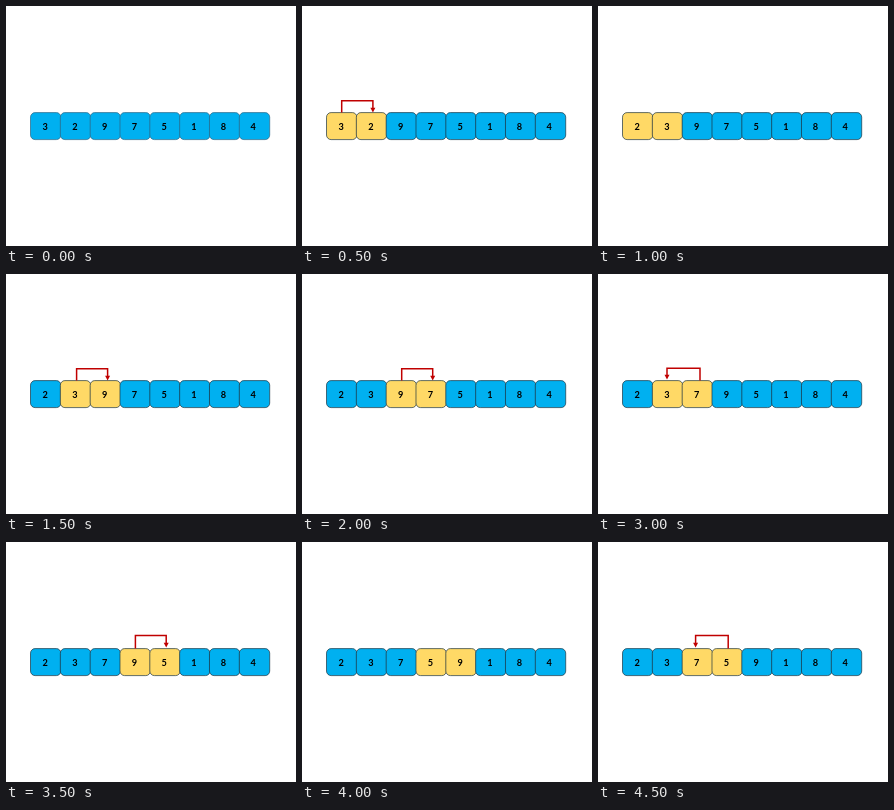
Recreate the animation shown at these times as an HTML page. Size 290 by 240 pixels, loop 5000 ms.

```html
<!DOCTYPE html>
<html lang="en">
<head>
<meta charset="utf-8">
<title>Insertion sort</title>
<style>
  html, body { margin: 0; width: 100%; height: 100%; overflow: hidden; background: #fff; }
  svg { display: block; width: 100%; height: 100%; }
  text { font: 700 9.2px Lato, "Open Sans", sans-serif; text-anchor: middle; fill: #000; }
</style>
</head>
<body>
<svg id="stage" viewBox="0 0 290 240">
  <g id="cells"></g>
  <g id="arrow" fill="none" stroke="#c00000" stroke-width="1.5">
    <path id="line"/>
    <path id="head" fill="#c00000" stroke="none"/>
  </g>
</svg>
<script>
const NS = "http://www.w3.org/2000/svg";
const LOOP = 5000, STEP = 500, PITCH = 29.83;
const BLUE = "#00b0f0", YELLOW = "#ffd966";
const DARK = "#1d3642", SOFT = "#2f6684";

// digits, highlighted pair start, arrow [from x, to x, top y, tip y], outline, vertical shift
const steps = [
  { row: "32975184", hot: -9, line: SOFT },
  { row: "32975184", hot: 0, arrow: [39.7, 70.9, 94.7, 106.5] },
  { row: "23975184", hot: 0 },
  { row: "23975184", hot: 1, arrow: [70.6, 101.6, 94.7, 106.5] },
  { row: "23975184", hot: 2, arrow: [99.7, 130.7, 94.7, 106.5] },
  { row: "32795184", hot: 2, line: SOFT, shift: -6.2 },
  { row: "23795184", hot: 1, arrow: [102, 69, 94.2, 105.5] },
  { row: "23795184", hot: 3, arrow: [129.4, 160.2, 93.5, 105.5] },
  { row: "23759184", hot: 3 },
  { row: "23759184", hot: 2, arrow: [130.2, 97.6, 93.5, 105.5] }
];

const $ = id => document.getElementById(id);

function add(parent, name, attrs) {
  const el = document.createElementNS(NS, name);
  set(el, attrs);
  return parent.appendChild(el);
}

function set(el, attrs) {
  for (const key in attrs) el.setAttribute(key, attrs[key]);
}

const cells = Array.from({ length: 8 }, (_, i) => ({
  box: add($("cells"), "rect", {
    x: 24.5 + i * PITCH, y: 106.6, width: 30.4, height: 27, rx: 4.6, "stroke-width": 0.7
  }),
  label: add($("cells"), "text", { x: 39.2 + i * 29.72, y: 123.5 })
}));

function draw(step) {
  const { row, hot, arrow, line = DARK, shift = 0 } = steps[step];
  $("cells").setAttribute("transform", `translate(0 ${shift})`);
  cells.forEach(({ box, label }, i) => {
    const lit = i === hot || i === hot + 1;
    set(box, { fill: lit ? YELLOW : BLUE, stroke: line });
    label.textContent = row[i];
  });
  $("arrow").style.display = arrow ? "" : "none";
  if (!arrow) return;
  const [from, to, top, tip] = arrow;
  $("line").setAttribute("d", `M${from} 106.4V${top}H${to}V${tip - 4}`);
  $("head").setAttribute("d", `M${to - 2.5} ${tip - 4.8}h5L${to} ${tip}z`);
}

const start = performance.now();
let shown = -1;

function tick() {
  const step = Math.floor((performance.now() - start) % LOOP / STEP);
  if (step !== shown) draw(shown = step);
  requestAnimationFrame(tick);
}
tick();
</script>
</body>
</html>
```
